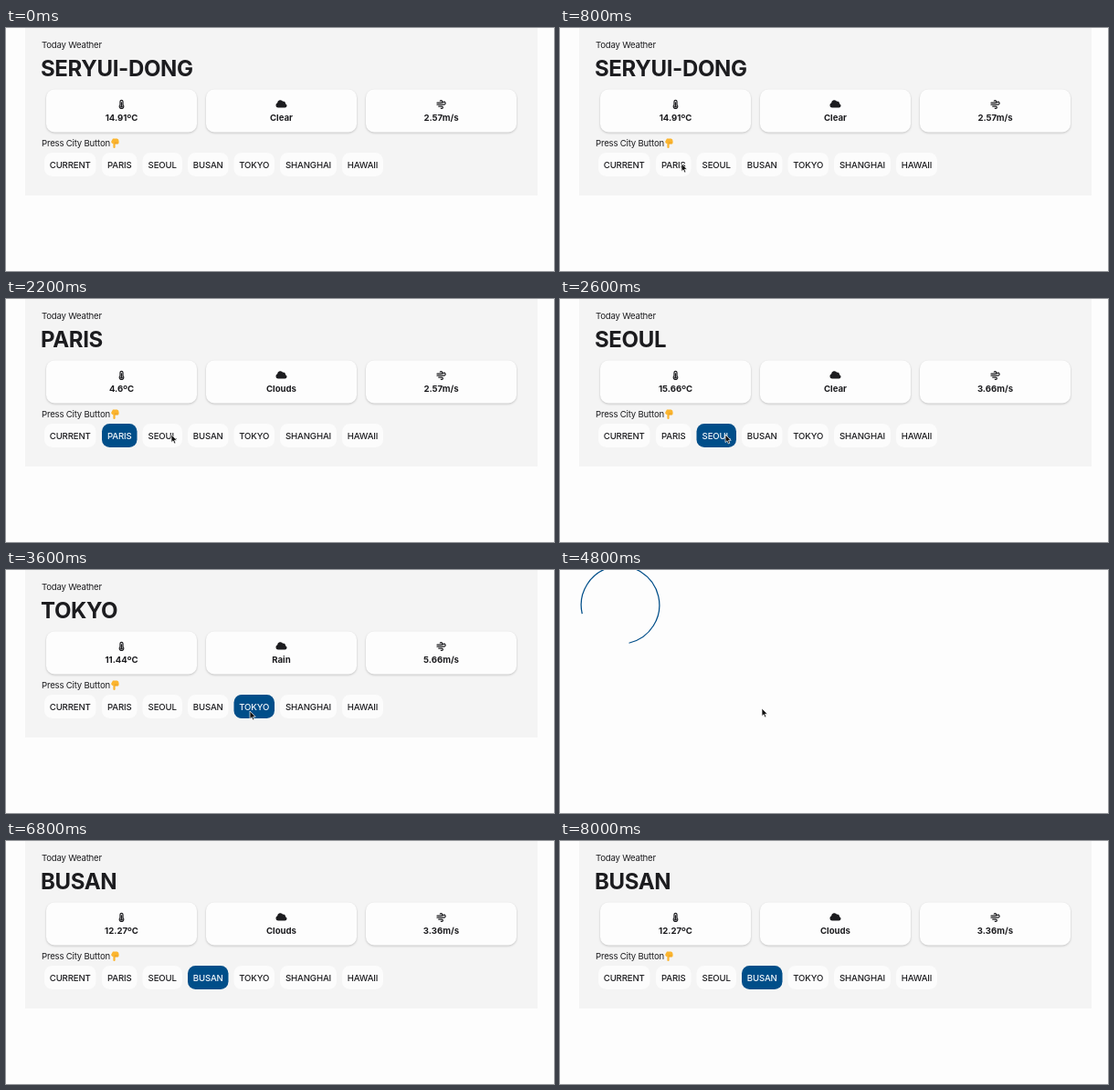
These frames come from a looping animation (600 px wide and 267 px high, 8200 ms). An HTML page:

```html
<!DOCTYPE html>
<html lang="en">
<head>
<meta charset="utf-8">
<title>Today Weather</title>
<style>
  html, body { margin: 0; width: 100%; height: 100%; overflow: hidden; background: #fdfdfd; }
  svg { display: block; width: 600px; height: 267px; }
  text { font: 400 9.6px Inter, "Liberation Sans", sans-serif; fill: #1c1c1f; }
  .label { letter-spacing: -.2px; }
  #city { font-size: 24px; font-weight: 700; letter-spacing: -.35px; }
  .value { font-weight: 700; text-anchor: middle; }
  .card { fill: #fdfdfd; filter: drop-shadow(0 1px 1.2px rgba(0, 0, 0, .2)); }
  .button rect { fill: #fcfcfc; }
  .button text { font-weight: 500; letter-spacing: -.12px; text-anchor: middle; }
  .button.on rect { fill: #004e89; }
  .button.on text { fill: #f4f8fb; }
  .ink { fill: #1c1c1f; }
  .line { fill: none; stroke: #1c1c1f; stroke-width: 1.2; stroke-linecap: round; stroke-linejoin: round; }
</style>
</head>
<body>
<svg viewBox="0 0 600 267">
  <rect width="600" height="267" fill="#fdfdfd"/>
  <g id="page">
    <rect x="21" width="561" height="184" fill="#f4f4f4"/>
    <text class="label" x="39" y="22.3">Today Weather</text>
    <text id="city" x="38" y="53"></text>
    <g id="cards"></g>
    <!-- thermometer -->
    <g transform="translate(126.5 84)">
      <path class="line" d="M-1.5 -3.2a1.5 1.5 0 0 1 3 0v3.6a2.3 2.3 0 1 1 -3 0z"/>
      <path class="line" stroke-width=".9" d="M0 -2.2v4"/>
      <circle class="ink" cy="2.2" r="1.2"/>
    </g>
    <!-- cloud -->
    <path class="ink" transform="translate(301.5 83.5)"
      d="M-3.6 4a2.7 2.7 0 0 1 -.8 -5.2a3.4 3.4 0 0 1 6.2 -1.6a2.2 2.2 0 0 1 2.7 2.5a2.2 2.2 0 0 1 -.6 4.3z"/>
    <!-- wind -->
    <path class="line" transform="translate(476.5 83.7)"
      d="M-4.5 -1.5h4.3a1.3 1.3 0 1 0 -1 -2.1M-4.5 .5h7.6a1.5 1.5 0 1 0 -1.2 -2.4M-2.8 2.4h3.4a1.2 1.2 0 1 1 -.9 2"/>
    <text class="label" x="39" y="130.2">Press City Button</text>
    <!-- pointing hand -->
    <g transform="translate(115 121.5)" fill="#fbb52f">
      <path d="M2 0h4.6q2 .6 2 3v1.6q0 1.5 -1.4 1.5h-2.6v3.3a1.1 1.1 0 0 1 -2.2 0v-3.6l-1.6 -.9q-.8 -.6 -.5 -1.8z"/>
      <path d="M4.6 6v-2.2M6.3 6v-2.2" stroke="#d98a1c" stroke-width=".5"/>
    </g>
    <g id="buttons"></g>
  </g>
  <circle id="spinner" r="44.4" fill="none" stroke="#004e89" stroke-width="1.3" pathLength="4" stroke-dasharray="3 1"/>
  <path id="cursor" d="M0 0v8.6l2 -1.8l1.4 3.2l1.5 -.7l-1.4 -3h2.7z" fill="#111" stroke="#fff" stroke-width=".7"/>
</svg>
<script>
  const LOOP = 8200, STEP = 200;
  const $ = id => document.getElementById(id);

  // start time, city, temperature, sky, wind
  const reports = [
    [0, "SERYUI-DONG", "14.91ºC", "Clear", "2.57m/s"],
    [1200, "PARIS", "4.6ºC", "Clouds", "2.57m/s"],
    [2600, "SEOUL", "15.66ºC", "Clear", "3.66m/s"],
    [3400, "TOKYO", "11.44ºC", "Rain", "5.66m/s"],
    [5000, "BUSAN", "12.27ºC", "Clouds", "3.36m/s"]
  ];
  const loads = [[930, 1200], [2330, 2600], [4733, 5000]];
  // time, x, y of the pointer tip
  const track = [
    [200, 205, 92], [800, 133, 149], [1600, 133, 149], [2200, 181, 149],
    [2600, 181, 149], [3400, 267, 155], [3600, 267, 155], [4000, 263, 155],
    [4600, 221, 152], [5400, 221, 152], [5600, 218, 151], [5800, 218, 151], [6600, 214, 280]
  ];
  const buttons = [
    ["CURRENT", 42, 56.5], ["PARIS", 105, 38.5], ["SEOUL", 149.5, 43.5], ["BUSAN", 199, 44.5],
    ["TOKYO", 249.5, 44.5], ["SHANGHAI", 300, 62], ["HAWAII", 368, 45]
  ];

  $("cards").innerHTML = [44, 219, 394].map(x =>
    `<rect class="card" x="${x}" y="67.5" width="165" height="47" rx="9"/>
     <text class="value" x="${x + 82.5}" y="101.5"></text>`).join("");
  $("buttons").innerHTML = buttons.map(([name, x, w]) =>
    `<g class="button"><rect x="${x}" y="137" width="${w}" height="26" rx="8.5"/>
     <text x="${x + w / 2}" y="153.6">${name}</text></g>`).join("");
  const values = document.querySelectorAll(".value");
  const buttonNodes = document.querySelectorAll(".button");

  function pointer(t) {
    const i = track.findIndex(p => p[0] > t);
    if (i < 1) return null;
    const [a, b] = [track[i - 1], track[i]];
    const p = (t - a[0]) / (b[0] - a[0]);
    const k = p * p * (3 - 2 * p);
    return [a[1] + (b[1] - a[1]) * k, a[2] + (b[2] - a[2]) * k];
  }

  function draw(t) {
    const [, city, ...weather] = reports.filter(r => r[0] <= t).pop();
    $("city").textContent = city;
    values.forEach((node, i) => node.textContent = weather[i]);
    buttonNodes.forEach((node, i) => node.classList.toggle("on", buttons[i][0] === city));

    const load = loads.find(([from, to]) => t >= from && t < to);
    $("page").style.display = load ? "none" : "";
    $("spinner").style.display = load ? "" : "none";
    if (load) {
      const p = (t - load[0]) / 750 % 1;
      const size = .8 + .2 * Math.abs(1 - 2 * p);
      $("spinner").setAttribute("transform", `translate(66 38.5) rotate(${135 + 360 * p}) scale(${size})`);
    }

    const tip = pointer(t);
    $("cursor").style.display = tip ? "" : "none";
    if (tip) $("cursor").setAttribute("transform", `translate(${tip})`);
  }

  const start = performance.now();
  let last = -1;
  function tick() {
    const t = Math.floor((performance.now() - start) % LOOP / STEP) * STEP;
    if (t !== last) draw(last = t);
    requestAnimationFrame(tick);
  }
  tick();
</script>
</body>
</html>
```
